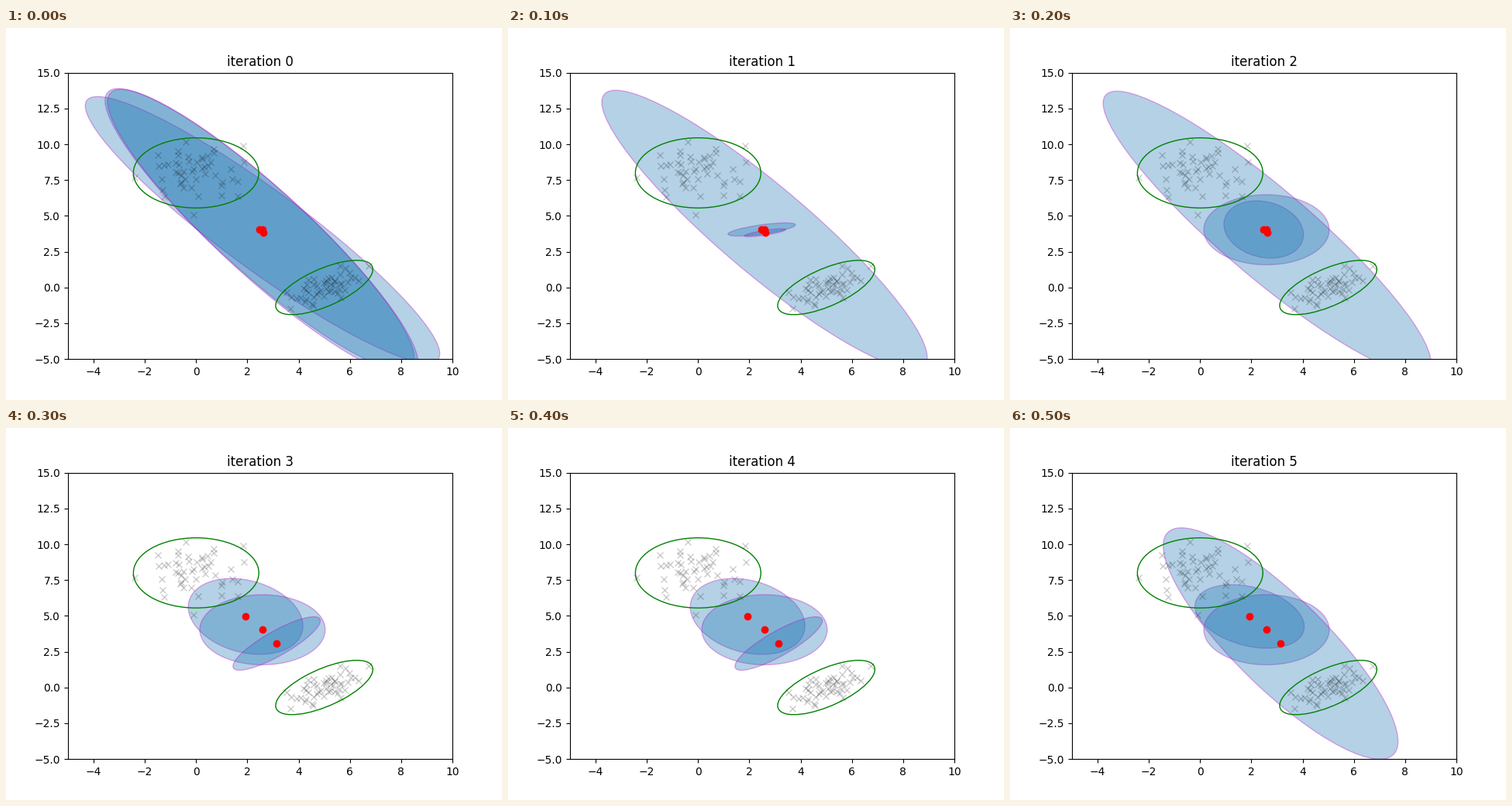
Write a matplotlib script that moves like this. It is 640x480 px and loops after 0.6 s.

```python
import numpy as np
import matplotlib.pyplot as plt
from matplotlib.animation import FuncAnimation
from matplotlib.patches import Ellipse

RADIUS = np.sqrt(5.991)  # 95 % confidence
GOLDEN_ANGLE = np.pi * (3 - np.sqrt(5))
SAMPLES = 50

# Component means before and after they separate
TOGETHER = [(2.48, 4.05), (2.59, 4.03), (2.61, 3.82)]
APART = [(1.93, 4.96), (2.59, 4.03), (3.14, 3.07)]

# Component shapes: standard deviation in x and y, correlation
UNIT = (1, 1, 0)
SEPARATED = [(.914, 1.083, -.25), UNIT, (.696, .763, .85)]
STEPS = [
    (TOGETHER, [(2.465, 4.02, -.914), (2.826, 3.8, -.93), (2.477, 4.09, -.914)]),
    (TOGETHER, [(.537, .188, .7), (2.594, 3.98, -.914), (.327, .111, .8)]),
    (TOGETHER, [(.634, .818, -.18), UNIT, (2.613, 4.04, -.915)]),
    (APART, SEPARATED),
    (APART, SEPARATED),
    (APART, [(.871, .906, -.32), UNIT, (1.872, 3.3, -.845)]),
]


def covariance(sx, sy, rho):
    return np.array([[sx * sx, rho * sx * sy], [rho * sx * sy, sy * sy]])


def confidence_ellipse(mean, cov, **style):
    values, vectors = np.linalg.eigh(cov)
    width, height = 2 * RADIUS * np.sqrt(values)
    angle = np.degrees(np.arctan2(vectors[1, 0], vectors[0, 0]))
    return ax.add_patch(Ellipse(mean, width, height, angle=angle, **style))


def scatter_cluster(mean, cov, reach, heading):
    """Gaussian cloud whose outermost sample lies at reach sigmas along heading."""
    share = np.linspace(1, 0, SAMPLES, endpoint=False)
    radius = np.sqrt(-2 * np.log(1 - share * (1 - np.exp(-reach**2 / 2))))
    jitter = rng.uniform(-1, 1, SAMPLES) * (1 - share)
    angle = heading + GOLDEN_ANGLE * np.arange(SAMPLES) + 2 * jitter
    offsets = np.linalg.cholesky(cov) @ (radius * [np.cos(angle), np.sin(angle)])
    for x, y in np.add(mean, offsets.T):
        ax.plot(x, y, "kx", alpha=.2)


rng = np.random.default_rng(4)
plt.rcParams["text.kerning_factor"] = 6
fig, ax = plt.subplots(figsize=(6.4, 4.8), dpi=100)
ax.set(xlim=(-5, 10), ylim=(-5, 15))

groups = [
    [confidence_ellipse(mean, covariance(*shape), facecolor="C0",
                        edgecolor="m", alpha=1 / 3)
     for mean, shape in zip(means, shapes)]
    for means, shapes in STEPS
]
clusters = [
    ((0, 8), np.eye(2), 2.95, -1.6),
    ((5, 0), np.array([[.6, .4], [.4, .6]]), 2.3, .25),
]
for mean, cov, reach, heading in clusters:
    confidence_ellipse(mean, cov, facecolor="none", edgecolor="g")
    scatter_cluster(mean, cov, reach, heading)

dots, = ax.plot([], [], "ro")
title = ax.set_title("")


def update(i):
    for k, group in enumerate(groups):
        for patch in group:
            patch.set_visible(k == i)
    dots.set_data(*zip(*STEPS[i][0]))
    title.set_text(f"iteration {i}")
    return [title, dots]


anim = FuncAnimation(fig, update, frames=len(STEPS), interval=100,
                     repeat=True, repeat_delay=0)
plt.show()
```
